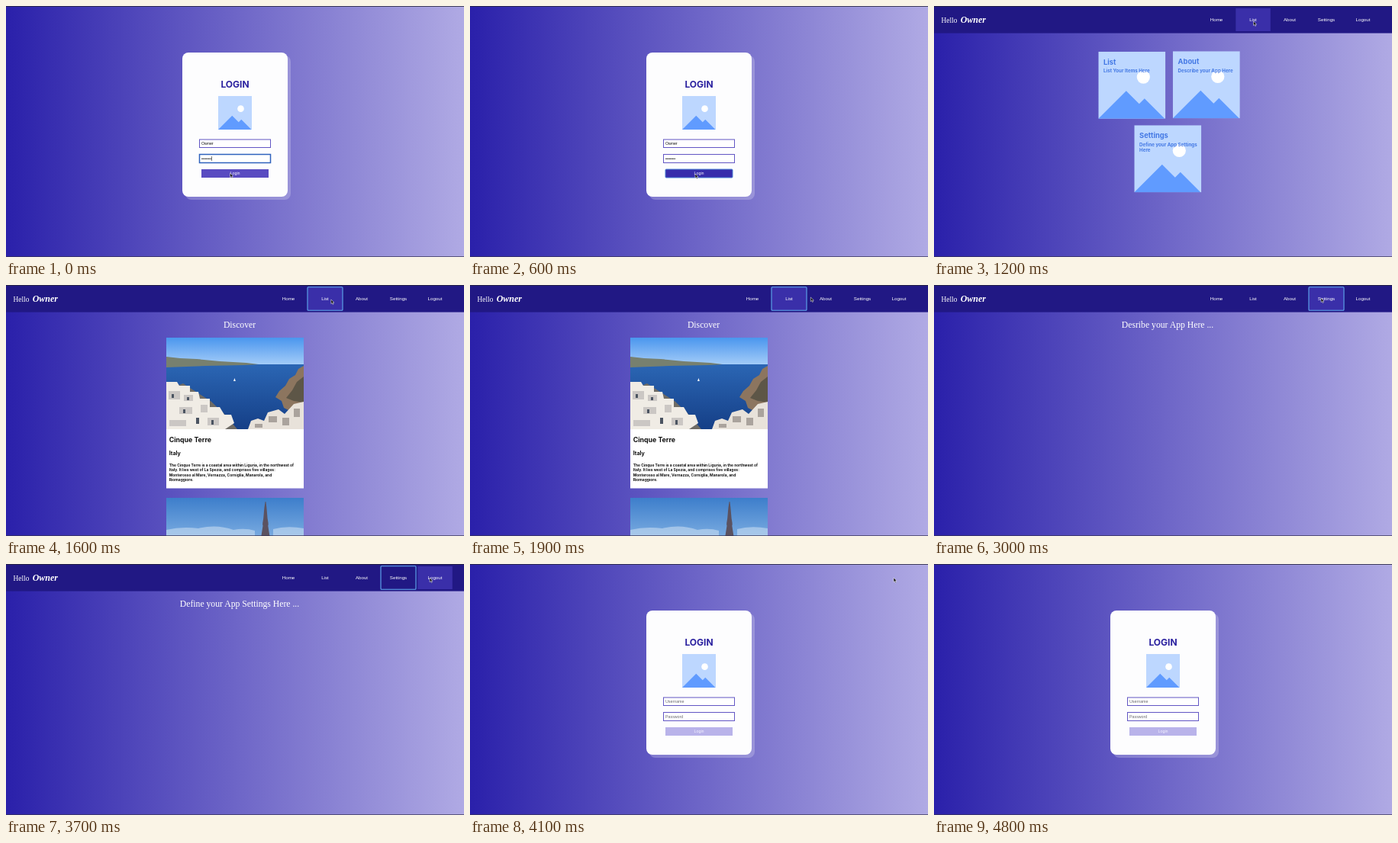
Recreate the animation shown at these times as an HTML page. Size 600x329 px, loop 4.9 s.

```html
<!DOCTYPE html>
<html lang="en">
<head>
<meta charset="utf-8">
<title>Login demo</title>
<style>
  html, body { margin: 0; width: 100%; height: 100%; overflow: hidden; background: #2a20aa; }
  svg { display: block; width: 100vw; height: 100vh; }
  text { white-space: pre; }
  .serif { font-family: "Liberation Serif", Times, serif; fill: #fff; }
  .sans { font-family: "Liberation Sans", Arial, sans-serif; }
  .bold { font-family: Inter, sans-serif; font-weight: 700; }
  .mid { text-anchor: middle; }
</style>
</head>
<body>
<svg viewBox="0 0 600 329" preserveAspectRatio="none">
  <defs>
    <linearGradient id="page">
      <stop offset="0" stop-color="#2a20aa"/>
      <stop offset="1" stop-color="#b0aae4"/>
    </linearGradient>
    <linearGradient id="sky" x2="0" y2="1">
      <stop offset="0" stop-color="#4a96ee"/>
      <stop offset="1" stop-color="#a5cdf8"/>
    </linearGradient>
    <linearGradient id="sea" x2="0" y2="1">
      <stop offset="0" stop-color="#2b66b4"/>
      <stop offset="1" stop-color="#153f87"/>
    </linearGradient>
    <linearGradient id="paris" x2="0" y2="1">
      <stop offset="0" stop-color="#3d7ecb"/>
      <stop offset="1" stop-color="#78aae0"/>
    </linearGradient>
    <symbol id="picture" viewBox="0 0 88 88">
      <path fill="#bdd7ff" d="M0 0h88v88H0z"/>
      <path fill="#609bff" d="M0 88 36.5 51.5 53.5 68.5 60.5 61.5 87 88z"/>
      <circle cx="59" cy="33.3" r="8.6" fill="#fff"/>
    </symbol>
    <clipPath id="bay"><path d="M210 69h180v120H210z"/></clipPath>
  </defs>

  <rect width="600" height="329" fill="url(#page)"/>

  <g id="login">
    <rect x="235" y="65" width="138" height="189" rx="8" fill="#fff" opacity=".22"/>
    <rect x="231" y="61" width="138" height="189" rx="8" fill="#fdfdfe"/>
    <text class="bold mid" x="300" y="106.5" font-size="12" fill="#2a209f">LOGIN</text>
    <use href="#picture" x="278" y="118" width="44" height="44"/>
    <rect x="253.5" y="175" width="93" height="10.5" fill="#fff" stroke="#6256c4"/>
    <text id="user" class="sans" x="256" y="182.2" font-size="5.3"></text>
    <rect id="passBox" x="253.5" y="194.5" width="93" height="11" fill="#fff"/>
    <text id="pass" class="sans" x="256" y="201.9" font-size="5.3"></text>
    <path id="caret" d="M269.5 197v6" stroke="#222" stroke-width=".6"/>
    <rect id="button" x="256" y="214" width="88" height="11"/>
    <text class="sans mid" x="300" y="221.3" font-size="5.4" fill="#f4f2ff">Login</text>
  </g>

  <g id="home"></g>

  <g id="list">
    <text class="serif mid" x="306" y="56" font-size="11.7">Discover</text>
    <g clip-path="url(#bay)">
      <rect x="210" y="69" width="180" height="36" fill="url(#sky)"/>
      <rect x="210" y="104" width="180" height="85" fill="url(#sea)"/>
      <path fill="#77806f" d="M210 94l18 2 22 1 30 3 35 2 16 2-20 1-50 1-51 2z"/>
      <path fill="#8c755f" d="M390 106l-7 4-4 8-8 5-5 9-8 7-5 8 8 5 3 9 10 5 16 3z"/>
      <path fill="#5d5647" d="M390 120l-9 7-6 11-8 10 10 4 13 2z"/>
      <path fill="#6f6c66" d="M210 138l22-9 20 13 16 10 19 18 16 19h-93z"/>
      <path fill="#f0ece5" d="M210 127h14l3 5h14v8h11l2 9h13v11h13l6 10h9l4 11-12 8h-77z"/>
      <path fill="#cbc7c4" d="M213 139h15v11h-15zM233 144h12v8h-12zM227 160h17v9h-17zM255 157h9v10h-9zM264 174h15v10h-15zM214 177h22v8h-22z"/>
      <path fill="#4b5461" d="M217 143h3v5h-3zM237 147h3v4h-3zM232 163h3v5h-3zM249 174h4v8h-4zM269 177h3v6h-3z"/>
      <path fill="#e8e2da" d="M317 189l4-11 9-3 8 3 5-11 14-4 8 6 12-13 13-3v36z"/>
      <path fill="#aaa39d" d="M344 172h11v8h-11zM362 174h9v10h-9zM377 162h8v11h-8zM326 182h10v5h-10z"/>
      <path fill="#fff" d="M298 126l1.4-4 1.4 4z"/>
    </g>
    <rect x="210" y="189" width="180" height="77.5" fill="#fff"/>
    <g id="story" class="bold" fill="#111"></g>
    <rect x="210" y="279" width="180" height="50" fill="url(#paris)"/>
    <path fill="#cfe2f5" opacity=".55" d="M210 321q20-5 42-2 24-6 46 2 15-3 28 1v7H210zM350 320q18-5 40-1v10h-40z"/>
    <path fill="#5b5260" d="M339.6 284h.8l1 8 1.2 14 1 6v3h-.4l2.2 14h-11l2.2-14h-.4v-3l1-6 1.2-14z"/>
  </g>

  <g id="about"><text class="serif mid" x="306" y="56" font-size="11.7">Desribe your App Here ...</text></g>
  <g id="settings"><text class="serif mid" x="306" y="56" font-size="11.7">Define your App Settings Here ...</text></g>

  <g id="nav">
    <rect width="600" height="35.6" fill="#211884"/>
    <text class="serif" x="9.5" y="22" font-size="9.4">Hello</text>
    <text class="serif" x="34.7" y="22" font-size="12" font-weight="700" font-style="italic">Owner</text>
    <rect id="hover" y="3" width="45.5" height="30" fill="#3a2fa9"/>
    <rect id="focus" y="2.7" width="46" height="30.6" rx="1" fill="none" stroke="#62aef2" stroke-width="1.1"/>
  </g>

  <path d="M0 .4h600" stroke="#29273a" stroke-width=".9"/>
  <path d="M0 328.6h600" stroke="#3a3756" stroke-width=".8"/>
  <path id="cursor" d="M0 0v5.6l1.3-1.2 1 2.1 1-.5-1-2h1.8z" fill="#111" stroke="#fff" stroke-width=".5"/>
</svg>

<script>
const LOOP = 4900, STEP = 100;
const $ = id => document.getElementById(id);
const pages = ['login', 'home', 'list', 'about', 'settings'];
const navItems = ['Home', 'List', 'About', 'Settings', 'Logout'];
const navX = i => 370 + 48 * i;

// Each entry is [start time, value].
const pageTimes = [[0, 'login'], [700, 'home'], [1500, 'list'], [2200, 'about'], [3100, 'settings'], [4100, 'login']];
const hoverTimes = [[0, -1], [1100, 1], [2000, 2], [2600, 3], [3700, 4]];
const focusTimes = [[0, -1], [1400, 1], [2100, 2], [3000, 3], [4000, 4]];
const buttonTimes = [[0, 'hover'], [600, 'pressed'], [700, 'disabled']];
const buttonFill = { hover: '#594bc1', pressed: '#372cab', disabled: '#b9b3ea' };
const cursorPath = [
  [0, 293.5, 219], [500, 295, 220], [700, 295, 220], [1200, 418.5, 20], [1500, 419, 20],
  [1900, 446.3, 16], [2200, 454, 17], [2400, 455, 17], [2800, 506, 17], [3400, 509, 17],
  [3600, 530, 17], [3700, 555, 18], [4100, 555, 18], [4500, 574, -8], [4900, 574, -8]
];

function addText(parent, cls, x, y, size, content, fill) {
  const el = document.createElementNS('http://www.w3.org/2000/svg', 'text');
  const attrs = { class: cls, x, y, 'font-size': size };
  if (fill) attrs.fill = fill;
  for (const key in attrs) el.setAttribute(key, attrs[key]);
  el.textContent = content;
  parent.append(el);
}

function addCard(x, y, title, lines) {
  const home = $('home');
  home.insertAdjacentHTML('beforeend', `<use href="#picture" x="${x}" y="${y}" width="88" height="88"/>`);
  addText(home, 'bold', x + 6.8, y + 17, 9.3, title, '#4378e4');
  lines.forEach((line, i) => addText(home, 'bold', x + 6.8, y + 27.4 + 7.3 * i, 6.2, line, '#4378e4'));
}

addCard(215.3, 59.8, 'List', ['List Your Items Here']);
addCard(312.8, 59.2, 'About', ['Describe your App Here']);
addCard(262.3, 156.2, 'Settings', ['Define your App Settings', 'Here']);

addText($('story'), 'bold', 213.7, 206, 8.8, 'Cinque Terre');
addText($('story'), 'bold', 213.7, 222.8, 7.1, 'Italy');
['The Cinque Terre is a coastal area within Liguria, in the northwest of',
 'Italy. It lies west of La Spezia, and comprises five villages:',
 'Monterosso al Mare, Vernazza, Corniglia, Manarola, and',
 'Riomaggiore.'
].forEach((line, i) => addText($('story'), 'bold', 213.7, 238.2 + 6.15 * i, 4.95, line));

navItems.forEach((label, i) => addText($('nav'), 'sans mid', navX(i), 20, 6.2, label, '#fff'));

const valueAt = (list, t) => list.filter(entry => entry[0] <= t).pop()[1];
const show = (id, on) => $(id).setAttribute('display', on ? 'inline' : 'none');

function placeBox(id, index, offset) {
  show(id, index >= 0);
  $(id).setAttribute('x', navX(index) - offset);
}

function cursorAt(t) {
  const next = cursorPath.findIndex(p => p[0] > t);
  const [t0, x0, y0] = cursorPath[next - 1], [t1, x1, y1] = cursorPath[next];
  const k = (t - t0) / (t1 - t0);
  return [x0 + (x1 - x0) * k, y0 + (y1 - y0) * k];
}

function drawLogin(t) {
  const filled = t < 700, typing = t < 600, state = valueAt(buttonTimes, t);
  $('user').textContent = filled ? 'Owner' : 'Username';
  $('pass').textContent = filled ? '•••••••' : 'Password';
  for (const id of ['user', 'pass']) $(id).setAttribute('fill', filled ? '#111' : '#68686e');
  $('passBox').setAttribute('stroke', typing ? '#2f62bd' : '#6256c4');
  $('passBox').setAttribute('stroke-width', typing ? 1.5 : 1);
  show('caret', typing);
  $('button').setAttribute('fill', buttonFill[state]);
  $('button').setAttribute('stroke', state === 'pressed' ? '#4d83d4' : 'none');
  $('button').setAttribute('rx', state === 'pressed' ? 1 : 0);
}

function draw(t) {
  const page = valueAt(pageTimes, t);
  pages.forEach(id => show(id, id === page));
  show('nav', page !== 'login');
  drawLogin(t);
  placeBox('hover', valueAt(hoverTimes, t), 22.7);
  placeBox('focus', valueAt(focusTimes, t), 23);
  $('cursor').setAttribute('transform', `translate(${cursorAt(t)})`);
}

const start = performance.now();
function tick() {
  const t = (performance.now() - start) % LOOP;
  draw(Math.floor(t / STEP) * STEP);
  requestAnimationFrame(tick);
}
tick();
</script>
</body>
</html>
```
